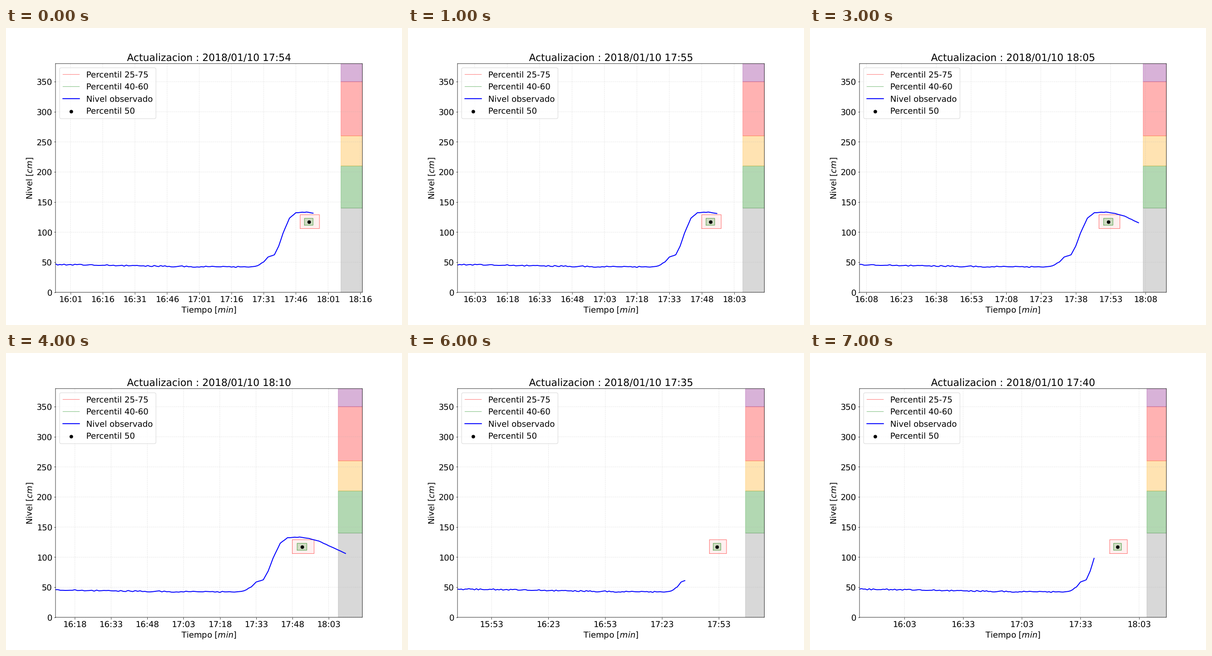
Write a matplotlib script that moves like this. It is 864 px wide and 648 px high and loops after 8000 ms.

```python
import matplotlib.pyplot as plt
import numpy as np
from matplotlib.animation import FuncAnimation
from matplotlib.patches import Rectangle

plt.rcParams.update({"font.family": "DejaVu Sans", "font.size": 18,
                     "text.hinting": "none", "path.snap": False})

# Minutes after midnight
FIRST, LAST = 15 * 60 + 30, 18 * 60 + 10

# River level: slow fall, sharp rise, crest, recession
KNOT_MIN = [0, 30, 60, 90, 115, 118, 121, 123, 126, 128, 130, 133, 136, 141, 145, 149, 160]
KNOT_CM = [47, 46.2, 44.1, 42.7, 42.1, 44, 50.5, 58.3, 62.3, 76.5, 98, 123, 132.5, 133.2, 131, 126.6, 106.3]

minutes = np.arange(LAST - FIRST + 1)
times = FIRST + minutes
ripple = np.random.default_rng(4).normal(0, 1, len(minutes)).clip(-1.5, 1.5)
levels = np.interp(minutes, KNOT_MIN, KNOT_CM) + ripple * np.where(minutes < 115, 0.65, 0.2)

BANDS = [(0, 140, "gray"), (140, 210, "green"), (210, 260, "orange"),
         (260, 350, "red"), (350, 380, "purple")]
UPDATES = ["17:54", "17:55", "18:00", "18:05", "18:10", "17:30", "17:35", "17:40"]


def clock(text):
    h, m = text.split(":")
    return int(h) * 60 + int(m)


def label(t):
    return f"{t // 60:02d}:{t % 60:02d}"


fig, ax = plt.subplots(figsize=(12, 9), dpi=72)


def box(x0, x1, y0, y1, color, face_alpha, name):
    """Forecast range: faint fill with a thin outline."""
    ax.add_patch(Rectangle((x0, y0), x1 - x0, y1 - y0, color=color,
                           alpha=face_alpha, lw=1))
    ax.plot([x0, x1, x1, x0, x0], [y0, y0, y1, y1, y0], color=color,
            lw=1, alpha=0.55, label=name)


def draw(i):
    ax.clear()
    now = clock(UPDATES[i])
    peak = clock("17:47") if now < clock("17:35") else clock("17:52")
    left, right = now - 120, peak + 25
    span = right - left

    for low, high, color in BANDS:
        ax.add_patch(Rectangle((peak + 15, low), 10, high - low, color=color,
                               alpha=0.3, lw=1))

    box(peak - 4, peak + 5, 106, 129, "red", 0.06, "Percentil 25-75")
    box(peak - 2, peak + 2, 111.5, 123, "green", 0.18, "Percentil 40-60")
    seen = times <= now
    ax.plot(times[seen], levels[seen], color="blue", lw=2, label="Nivel observado")
    ax.scatter([peak], [117], s=46, color="black", zorder=3, label="Percentil 50")

    # Ticks count from one full span before the left edge
    step = 15 if span <= 150 else 30
    ticks = [t for t in range(left - span, right + 1, step) if t >= left]
    ax.set_xticks(ticks, [label(t) for t in ticks])
    ax.set_yticks(range(0, 351, 50))
    ax.set_xlim(left, right)
    ax.set_ylim(0, 380)
    ax.grid(ls="--", alpha=0.35)
    ax.set_xlabel("Tiempo [$min$]")
    ax.set_ylabel("Nivel [$cm$]")
    ax.set_title(f"Actualizacion : 2018/01/10 {UPDATES[i]}")
    ax.legend(loc="upper left")
    return []


anim = FuncAnimation(fig, draw, frames=len(UPDATES), interval=1000,
                     init_func=lambda: [], repeat=True, repeat_delay=0)
plt.show()
```
